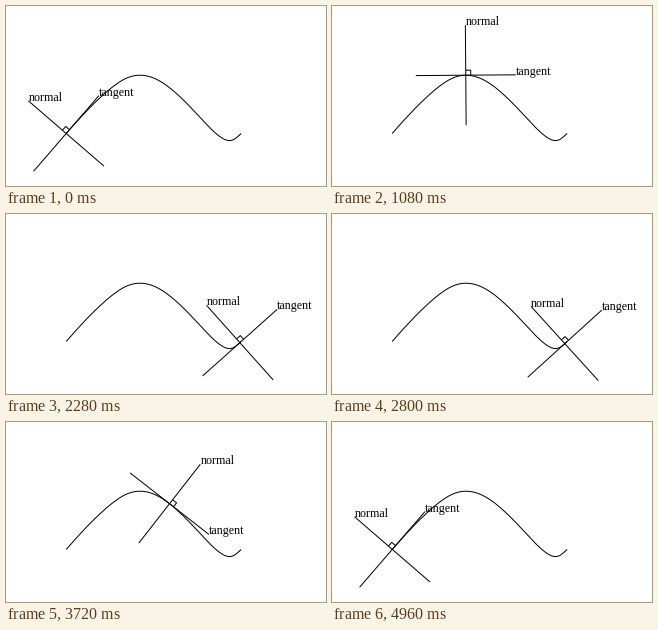
Write a matplotlib script that moves like this. It is 320 px wide and 180 px high and loops after 5 s.

```python
import numpy as np
import matplotlib.pyplot as plt
from matplotlib.animation import FuncAnimation

W, H, DPI = 320, 180, 100
FRAMES, INTERVAL = 125, 40
PX = 72 / DPI          # one pixel in points
REACH, CORNER = 50, 5  # half length of the lines, side of the square mark

# Three joined cubic Bezier segments, y pointing down.
SEGMENTS = np.array([
    [(60.2, 127.5), (76.7, 108.4), (101.9, 81.3), (118.7, 73.0)],
    [(118.7, 73.0), (147.0, 58.9), (170.7, 86.3), (200.7, 118.5)],
    [(200.7, 118.5), (223.3, 142.7), (227.2, 134.2), (235.2, 127.5)],
])


def locate(u):
    """Point and unit tangent at u in 0..1 along the whole path."""
    i = min(int(u * 3), 2)
    v = u * 3 - i
    w = 1 - v
    a, b, c, d = SEGMENTS[i]
    point = w**3 * a + 3 * w * w * v * b + 3 * w * v * v * c + v**3 * d
    slope = w * w * (b - a) + 2 * w * v * (c - b) + v * v * (d - c)
    return point, slope / np.hypot(*slope)


fig = plt.figure(figsize=(W / DPI, H / DPI), dpi=DPI, facecolor="white")
ax = fig.add_axes([0, 0, 1, 1])
ax.set_xlim(0, W)
ax.set_ylim(H, 0)
ax.axis("off")


def stroke(points=((0, 0),)):
    line, = ax.plot(*np.transpose(points), color="black", lw=PX,
                    solid_capstyle="butt", solid_joinstyle="miter", snap=False)
    return line


def label(word):
    return ax.text(0, 0, word, family="Liberation Serif", size=12 * PX,
                   color="black", ha="left", va="baseline")


stroke([locate(u)[0] for u in np.linspace(0, 1, 301)])
tangent, normal, corner = stroke(), stroke(), stroke()
tangent_label, normal_label = label("tangent"), label("normal")


def update(k):
    u = (1 - np.cos(2 * np.pi * k / FRAMES)) / 2
    p, t = locate(u)
    n = np.array([t[1], -t[0]])
    for line, text, way in ((tangent, tangent_label, t),
                            (normal, normal_label, n)):
        tip = p + REACH * way
        line.set_data(*np.transpose([p - REACH * way, tip]))
        text.set_position(tip)
    mark = [p + CORNER * t, p + CORNER * (t + n), p + CORNER * n]
    corner.set_data(*np.transpose(mark))
    return tangent, normal, corner, tangent_label, normal_label


anim = FuncAnimation(fig, update, frames=FRAMES, interval=INTERVAL,
                     repeat=True, repeat_delay=0)
plt.show()
```
